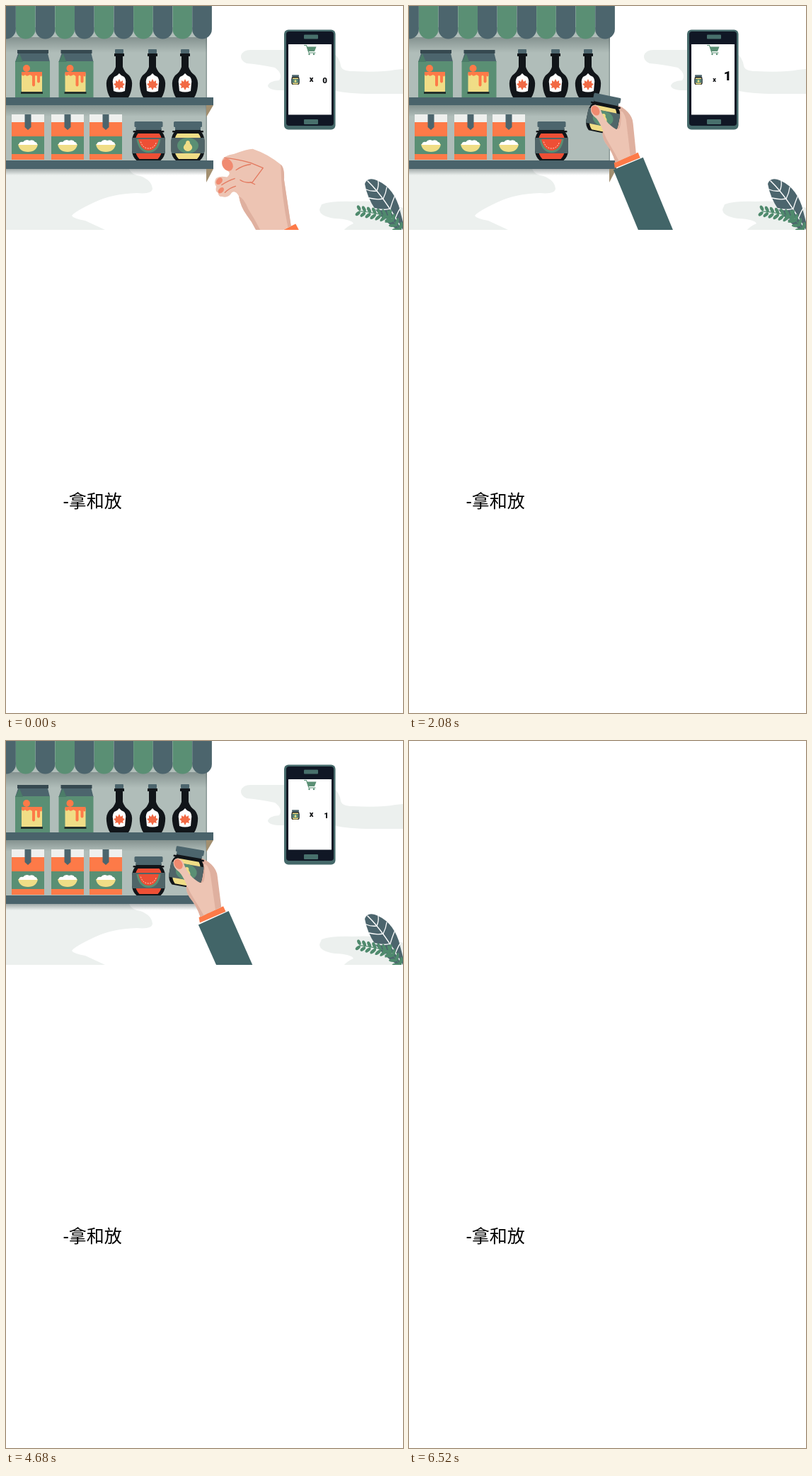
Write an HTML page with a canvas that moves like this. It is 561x998 px and loops after 7840 ms.

```html
<!DOCTYPE html>
<html lang="zh">
<head>
<meta charset="utf-8">
<style>
html, body { margin: 0; width: 100%; height: 100%; overflow: hidden; background: #fff; }
canvas { display: block; }
</style>
</head>
<body>
<canvas id="stage" width="561" height="998"></canvas>
<script>
const ctx = document.getElementById('stage').getContext('2d');
const LOOP = 7840, SCENE = 6520, STEP = 40;
const GRAB = 1400, RELEASE = 5000;
const SLATE = '#4c656d', GREEN = '#5a8f74', CORAL = '#fd7a48', YELLOW = '#f0dd86',
  BLACK = '#111519', RED = '#ee4f35', SKIN = '#edc4b3', SHADE = '#dfb09f',
  NAIL = '#f08a70', MIST = '#ecf0ee', SLEEVE = '#426568';

function rect(c, x, y, w, h) {
  ctx.fillStyle = c;
  ctx.fillRect(x, y, w, h);
}
function round(c, x, y, w, h, r) {
  ctx.fillStyle = c;
  ctx.beginPath();
  ctx.roundRect(x, y, w, h, r);
  ctx.fill();
}
function oval(c, x, y, rx, ry = rx, a = 0) {
  ctx.fillStyle = c;
  ctx.beginPath();
  ctx.ellipse(x, y, rx, ry, a, 0, Math.PI * 2);
  ctx.fill();
}
function shape(c, d) {
  ctx.fillStyle = c;
  ctx.fill(new Path2D(d));
}
function line(c, w, d) {
  ctx.strokeStyle = c;
  ctx.lineWidth = w;
  ctx.lineCap = ctx.lineJoin = 'round';
  ctx.stroke(new Path2D(d));
}
function at(x, y, s, deg, draw) {
  ctx.save();
  ctx.translate(x, y);
  ctx.rotate(deg * Math.PI / 180);
  ctx.scale(s, s);
  draw();
  ctx.restore();
}
function fade(x, y, w, h, alpha) {
  const g = ctx.createLinearGradient(0, y, 0, y + h);
  g.addColorStop(0, `rgba(50,65,65,${alpha})`);
  g.addColorStop(1, 'rgba(50,65,65,0)');
  rect(g, x, y, w, h);
}

// Smooth curve through keys of the form [time, ...values]
function follow(keys, t) {
  let i = 0;
  while (i < keys.length - 2 && t > keys[i + 1][0]) i++;
  const a = keys[i], b = keys[i + 1];
  const p = keys[i - 1] || a, q = keys[i + 2] || b;
  const d = b[0] - a[0], u = (t - a[0]) / d;
  return a.slice(1).map((v, k) => {
    const n = k + 1;
    const m0 = (b[n] - p[n]) / (b[0] - p[0]) * d;
    const m1 = (q[n] - v) / (q[0] - a[0]) * d;
    const c = b[n] - v;
    return v + u * m0 + u * u * (3 * c - 2 * m0 - m1) + u * u * u * (m0 + m1 - 2 * c);
  });
}

// x, y, scale, degrees
const EMPTY = [
  [5000, 246, 178, .77, -2], [5680, 292, 195, .865, -2], [6520, 313, 223, 1.09, -1],
  [6820, 317, 231, 1.13, 0], [7440, 288, 203, 1, 0], [7920, 250, 180, .77, 0]
];
const HOLD = [
  [1400, 257, 190, .97, 7], [1640, 258, 180, .96, 9], [2080, 275.5, 152, .97, 11.5],
  [2500, 296, 166, 1.15, 12], [3000, 299, 193, 1.42, 11], [3760, 277, 196, 1.45, 10],
  [4680, 256, 178, 1, 10], [5000, 257, 189, .97, 7]
];

function backdrop() {
  shape(MIST, 'M345 62H440Q470 62 473 84Q474 92 490 92Q530 94 550 90L561 89V124H520Q480 124 464 119H385Q370 118 370 112Q372 106 386 105Q392 96 380 87Q355 82 340 81Q331 77 332 70Q335 62 345 62Z');
  shape(MIST, 'M0 230H174Q177 238 190 240Q206 246 207 258Q206 266 185 264Q150 265 125 277Q97 290 93 296Q95 300 112 303L140 316H0Z');
  shape(MIST, 'M446 280Q460 275 490 276Q530 273 561 285V316H478Q482 311 491 307Q488 301 465 300Q443 297 443 287Z');
}

function carton() {
  rect('#364950', 16, 62, 44, 5);
  shape(SLATE, 'M17 67H59L62 79H13Z');
  rect(GREEN, 13, 78, 49, 51);
  shape('#4b7c68', 'M13 79L19 67L24 79Z');
  rect(YELLOW, 22, 95, 29, 26);
  oval(CORAL, 29, 88, 5);
  shape(CORAL, 'M22 93H51V98Q49 101 48 98V107Q46 110 44 107V99Q42 97 41 99V112Q39 115 37 112V99Q34 96 32 98Q29 100 27 97Q24 100 22 97Z');
  rect('#24302c', 21, 121, 31, 3);
}

function bottle() {
  shape(BLACK, 'M-7 67H7V71H5V86Q7 93 14 98Q19 104 18 113Q17 123 13 129H-13Q-17 123 -18 113Q-19 104 -14 98Q-7 93 -5 86V71H-7Z');
  round(SLATE, -6, 61, 12, 6, 1);
  shape('#fff', 'M0 95Q3 99 7 100Q10 104 9 109L8 120Q0 123 -8 120L-9 109Q-10 104 -7 100Q-3 99 0 95Z');
  shape('#f26a45', 'M0 103L2 107L5 105L5 109L8 110L5 113L6 116L2 115L0 119L-2 115L-6 116L-5 113L-8 110L-5 109L-5 105L-2 107Z');
}

function riceBox() {
  rect(CORAL, 0, 153, 46, 64);
  rect('#eff0ee', 0, 153, 46, 11);
  shape(SLATE, 'M18.5 153H27.5V171L23 175L18.5 171Z');
  rect(GREEN, 0, 184, 46, 25);
  shape(YELLOW, 'M9 195H37Q35 206 23 206Q11 206 9 195Z');
  shape('#fff', 'M10 196Q11 191 16 192Q20 187 25 190Q31 188 33 192Q36 192 36 196Z');
}

function jar(fill, label) {
  const body = new Path2D('M-17 -14Q-23 -9 -23.5 0V14Q-23 23 -17 28H17Q23 23 23.5 14V0Q23 -9 17 -14Z');
  ctx.fillStyle = BLACK;
  ctx.fill(body);
  rect(BLACK, -18, -17, 36, 5);
  round(BLACK, -22, -14, 44, 2.5, 1);
  shape(fill, 'M-15 -10H15Q19 -5 19 3V13Q18 21 13 26H-13Q-18 21 -19 13V3Q-19 -5 -15 -10Z');
  ctx.save();
  ctx.clip(body);
  rect('#506568', -25, -4, 50, 22);
  ctx.restore();
  round(SLATE, -20, -27, 40, 8, 1.5);
  rect(SLATE, -18, -20, 36, 5);
  label();
}
function pearJar() {
  jar(YELLOW, () => {
    oval(GREEN, 0, 7, 15, 11);
    shape(YELLOW, 'M0 0Q3 0 3 4Q7 8 6 11Q4 15 0 15Q-4 15 -6 11Q-7 8 -3 4Q-3 0 0 0Z');
  });
}
function melonJar() {
  jar(RED, () => {
    shape(GREEN, 'M-17 -2H17Q14 17 0 17Q-14 17 -17 -2Z');
    shape(RED, 'M-14.5 -2H14.5Q11 14 0 14Q-11 14 -14.5 -2Z');
    ctx.setLineDash([1, 2.5]);
    line('#ffe9d8', 1, 'M-11 2Q-8 11 0 11Q8 11 11 2');
    ctx.setLineDash([]);
  });
}

function shelf(jarHome) {
  rect('#b0bdb9', 0, 30, 284, 200);
  rect('#8b9a98', 282.5, 40, 1.5, 180);
  fade(0, 44, 284, 22, .35);
  fade(0, 140, 284, 16, .35);
  fade(0, 230, 284, 9, .4);
  shape('#a28f70', 'M283 140H293L283 157ZM283 230H293L283 249Z');
  const w = 27.7;
  for (let i = 0; i < 11; i++) {
    const x = i * w - 13.8;
    round(i % 2 ? GREEN : SLATE, x, -2, w, 48.5, [0, 0, w / 2, w / 2]);
  }
  rect('#4a636b', 0, 129, 293, 11);
  rect('#4a636b', 0, 218, 293, 12);
  for (const x of [0, 61.5]) at(x, 0, 1, 0, carton);
  for (const x of [160, 207, 253]) at(x, 0, 1, 0, bottle);
  for (const x of [8, 64, 118]) at(x, 0, 1, 0, riceBox);
  at(201.5, 190, 1, 0, melonJar);
  if (jarHome) at(257, 190, 1, 0, pearJar);
}

function word(s, x, y, size) {
  ctx.font = `900 ${size}px Roboto, sans-serif`;
  ctx.textAlign = 'center';
  ctx.textBaseline = 'alphabetic';
  ctx.fillStyle = '#0b0d10';
  ctx.fillText(s, x, y + size * .355);
}

function phone(t) {
  round('#45696a', 393, 33.5, 72.5, 141, 6);
  round('#101725', 396, 36, 67, 133, 4);
  rect('#fff', 399, 54, 61, 99.5);
  round('#48706c', 421, 40.5, 20, 6, 1);
  round('#48706c', 421, 160, 20, 7, 1);
  line(GREEN, 1.1, 'M421.5 55.5H424.5L428 66H437');
  shape(GREEN, 'M425 57.5H438.5L436 64H427Z');
  oval(GREEN, 428.5, 68, 1.2);
  oval(GREEN, 435, 68, 1.2);
  at(409, 104, .25, 0, pearJar);
  const pop = [1860, 5460].reduce((m, s) => {
    const u = (t - s) / 440;
    return u > 0 && u < 1 ? Math.sin(Math.PI * u) : m;
  }, 0);
  const n = t >= 1860 && t < 5460 ? '1' : '0';
  word('x', 431.5, 103.5 + pop * .5, 11 - pop * 2);
  word(n, 450.5 + (n === '1' ? 2 : 0) - pop * 2.5, 104.5 - pop * 6, 11.5 + pop * 7);
}

function fern(length, count) {
  line('#4f8a6d', 1.3, `M0 0Q${-length / 2} ${-length * .06} ${-length} 0`);
  for (let i = 0; i < count; i++) {
    const x = -length * i / (count - 1), r = 6.2 - i * .35;
    oval('#4f8a6d', x - 2, -4.2, r, 2.3, .9);
    oval('#4f8a6d', x - 2, 3.8, r, 2.3, -.9);
  }
}

function plant(t) {
  shape(SLATE, 'M507 251Q510 242 521 245Q545 253 555 282L561 305V316H553Q514 291 507 251Z');
  line('#fff', 1.5, 'M511 247Q535 270 560 316');
  line('#fff', 1.3, 'M524 261Q527 254 526 247M533 272Q537 264 538 256M543 286Q546 276 549 269M551 298Q554 290 557 286M524 261Q516 262 509 259M533 272Q525 274 513 271M543 286Q533 289 521 286M551 298Q543 302 534 301');
  const sway = Math.sin(t / SCENE * Math.PI * 6) * 1.5;
  at(543, 298, 1, 11 + sway, () => fern(44, 7));
  at(556, 315, 1, 50 + sway, () => fern(24, 4));
}

// Pinching hand, anchored on the thumb nail
function emptyHand() {
  ctx.translate(-288, -203);
  shape(SLEEVE, 'M329 315L388 291L500 541L441 567Z');
  shape(CORAL, 'M326 305L375 282L380 292L330 316Z');
  shape(SKIN, 'M281 198Q283 192 297 190Q314 184 321 184Q341 191 357 205Q362 209 361 225L369 285L329 303Q322 283 312 270Q304 259 302 245Q298 237 293 240Q288 248 280 245Q276 246 275 240Q271 238 273 232Q269 227 273 221Q278 218 287 220Q294 214 286 211Q280 206 281 198Z');
  shape(SHADE, 'M302 245Q308 247 314 262Q325 280 334 300L329 303Q322 283 312 270Q304 259 302 245Z');
  shape(SHADE, 'M357 205Q362 209 361 225L369 285L365 287Q357 245 357 205Z');
  oval(NAIL, 288, 204, 6.5, 8.5, -.6);
  oval(NAIL, 277, 225, 3.5, 5, .7);
  oval(NAIL, 279, 237, 3, 4.5, .8);
  line('#e3795f', 1.2, 'M284 195Q298 196 318 202L334 209L320 227Q311 229 304 224M299 211Q308 205 318 204M280 230Q289 224 297 222M284 240Q290 234 298 232M317 227L323 230');
}

function holdingHand() {
  ctx.translate(-277, -196);
  shape(SLEEVE, 'M300 314L362 286L475 541L413 568Z');
  shape(CORAL, 'M301 299L351 276L356 287L303 310Z');
  shape(SHADE, 'M304 177Q316 180 327 191Q338 202 339 215L347 278L304 298L280 230Z');
  at(277, 196, 1.45, 10, pearJar);
  shape(SKIN, 'M249 190Q247 180 257 178Q268 179 272 194Q281 214 294 222Q306 232 311 225Q315 212 312 190Q318 188 324 207L335 283L304 298Q297 276 282 258Q273 244 276 232Q266 208 256 202Q250 197 249 190Z');
  shape(SHADE, 'M276 233Q284 251 294 266Q303 280 311 295L304 298Q297 276 282 258Q273 244 276 233Z');
  oval(NAIL, 259, 190, 8, 11, -.55);
}

function draw(t) {
  ctx.setTransform(1, 0, 0, 1, 0, 0);
  rect('#fff', 0, 0, 561, 998);
  if (t < SCENE) {
    const held = t >= GRAB && t < RELEASE;
    ctx.save();
    ctx.beginPath();
    ctx.rect(0, 0, 561, 316);
    ctx.clip();
    backdrop();
    shelf(!held);
    phone(t);
    plant(t);
    if (held) {
      const [x, y, s, r] = follow(HOLD, t);
      at(x, y, s / 1.45, r - 10, holdingHand);
    } else {
      const [x, y, s, r] = follow(EMPTY, t < GRAB ? t + SCENE : t);
      at(x, y, s, r, emptyHand);
    }
    ctx.restore();
  }
  ctx.font = '25px "Liberation Sans", "Noto Sans CJK SC", "Noto Sans CJK", sans-serif';
  ctx.textAlign = 'left';
  ctx.textBaseline = 'alphabetic';
  ctx.fillStyle = '#000';
  ctx.fillText('-拿和放', 80.5, 708);
}

function tick() {
  const t = performance.now() % LOOP;
  draw(Math.floor(t / STEP) * STEP);
  requestAnimationFrame(tick);
}
tick();
</script>
</body>
</html>
```
